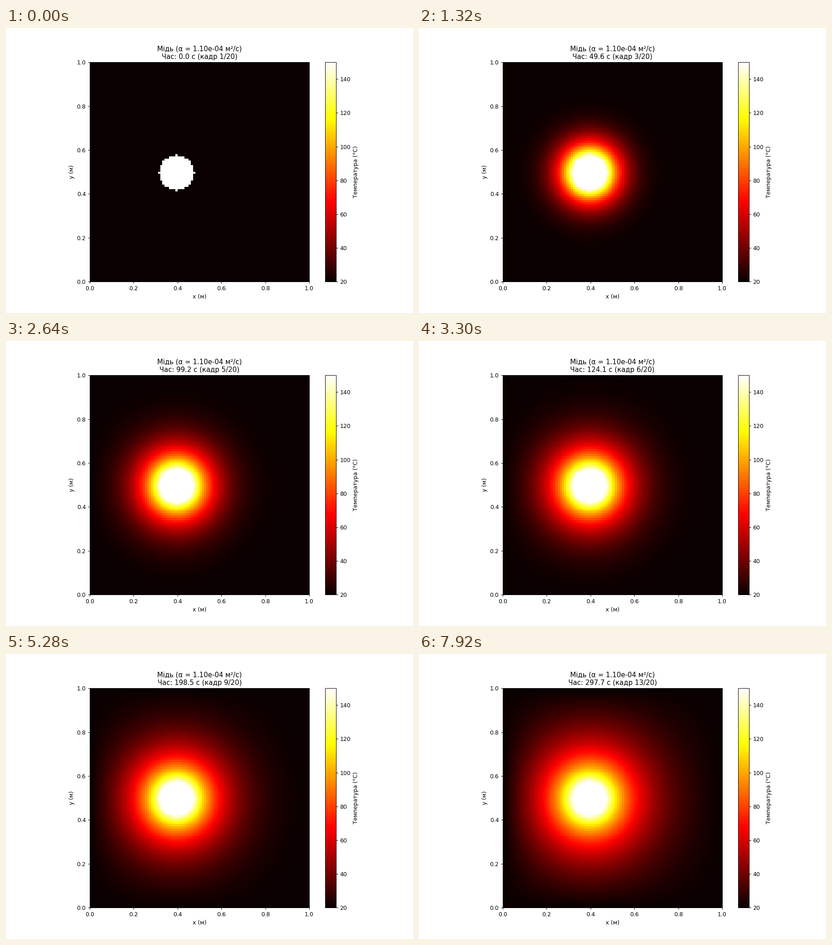
A matplotlib script that plays this animation: 894x626 px, repeating every 8000 ms.

```python
import matplotlib.pyplot as plt
import numpy as np
from matplotlib.animation import FuncAnimation

DPI = 89.4
WIDTH, HEIGHT = 894, 626
LOOP_MS, INTERVAL_MS, STATE_MS = 8000, 40, 660

N = 100
ALPHA = 1.10e-4
T_COLD, T_HOT = 20.0, 150.0
TOTAL_TIME, TOTAL_STATES = 500, 20

dx = 1 / (N - 1)
dt = dx**2 / (4 * ALPHA)
steps_per_state = int(TOTAL_TIME / dt) // TOTAL_STATES

row, col = np.mgrid[:N, :N]
source = (col - int(0.4 * (N - 1)))**2 + (row - int(0.5 * (N - 1)))**2 <= 8**2


def diffuse(temp, steps):
    """Explicit heat equation with cold edges and a source held hot."""
    temp = temp.copy()
    k = ALPHA * dt / dx**2
    for _ in range(steps):
        inner = temp[1:-1, 1:-1]
        laplacian = (temp[2:, 1:-1] + temp[:-2, 1:-1]
                     + temp[1:-1, 2:] + temp[1:-1, :-2] - 4 * inner)
        temp[1:-1, 1:-1] = inner + k * laplacian
        temp[source] = T_HOT
    return temp


states = [np.where(source, T_HOT, T_COLD)]
while len(states) * STATE_MS < LOOP_MS:
    states.append(diffuse(states[-1], steps_per_state))

plt.rcParams["font.family"] = "DejaVu Sans"
# The tiny margin keeps the pixel size from rounding down.
fig, ax = plt.subplots(
    figsize=((WIDTH + 1e-6) / DPI, (HEIGHT + 1e-6) / DPI), dpi=DPI)
image = ax.imshow(states[0], cmap="hot", vmin=T_COLD, vmax=T_HOT,
                  origin="lower", extent=[0, 1, 0, 1],
                  interpolation="nearest")
fig.colorbar(image, ax=ax, label="Температура (°C)")
ax.set_xlabel("x (м)")
ax.set_ylabel("y (м)")
title = ax.set_title("")


def update(frame):
    middle_ms = (frame + 0.5) * INTERVAL_MS
    index = int(middle_ms // STATE_MS)
    image.set_data(states[index])
    seconds = index * steps_per_state * dt
    title.set_text(f"Мідь (α = {ALPHA:.2e} м²/с)\n"
                   f"Час: {seconds:.1f} с (кадр {index + 1}/{TOTAL_STATES})")
    return image, title


update(0)
anim = FuncAnimation(fig, update, frames=LOOP_MS // INTERVAL_MS,
                     interval=INTERVAL_MS, repeat=True, repeat_delay=0)
plt.show()
```
